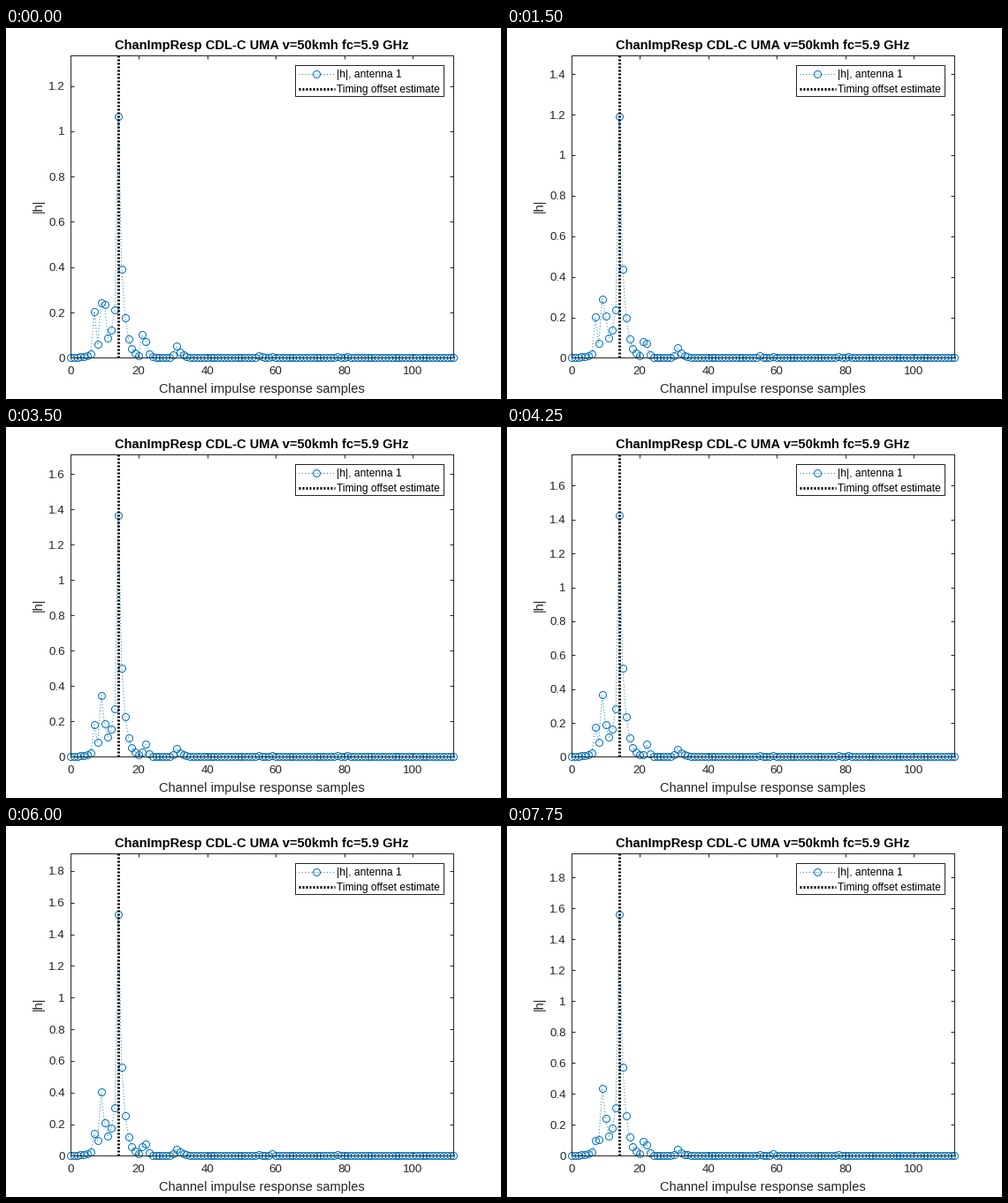
A matplotlib script that plays this animation: 560x420 px, repeating every 8 s.

```python
import matplotlib.pyplot as plt
import numpy as np
from matplotlib.animation import FuncAnimation
from matplotlib.lines import Line2D
from matplotlib.patches import Rectangle
from matplotlib.transforms import Affine2D

W, H = 560, 420
FRAMES, STEP_MS = 32, 250
PX = 0.72  # one pixel in points at 100 dpi
BLUE, INK = "#0072BD", "#262626"
LEFT, RIGHT, TOP, BOTTOM = 72.8, 506.4, 31.2, 373.4
PEAK = 14

plt.rcParams.update({
    "font.family": "Liberation Sans",
    "lines.scale_dashes": False,
    "text.color": "black",
})

taps = np.arange(113)


def response(t):
    """Magnitude of every tap at t seconds."""
    peak = 1.2376 + .326 * np.sin(.275 * (t - 2))
    lag = np.abs(taps - PEAK)
    h = np.where(taps < PEAK,
                 .2 * peak * np.maximum(lag, 1) ** -.82,
                 peak * np.exp(-lag ** .85))

    # onset, then the four early paths
    h[:7] = (.017 + .0013 * t) * .6 ** (6 - taps[:7])
    h[7] = .205 * np.cos(.136 * t)
    h[8] = .0615 + .0055 * t
    h[9] = .245 + .0325 * t - .001 * t * t
    h[10] = np.hypot(.188, .038 * (t - 3.75))

    # late echoes: place, height, decay per tap
    fading = np.hypot(.014, .105 * np.sin(.305 * (t - 4.2)))
    for at, amp, fall in ((21, fading, .2), (22, .073, .23),
                          (31, .051 - .0012 * t, .5), (55, .009, .4),
                          (59, .005 + .001 * t, .4), (78, .006, .4),
                          (81, .005, .5)):
        rate = np.where(taps > at, fall, fall / 2)
        h = np.maximum(h, amp * rate ** np.abs(taps - at))
    return np.maximum(h, .001)


def label(x, y, s, size, **kw):
    kw = {"va": "baseline", "rotation_mode": "anchor", **kw}
    fig.text(x / W, 1 - y / H, s, fontsize=size * PX, **kw)


def overlay(artist):
    artist.set_transform(to_px)
    fig.add_artist(artist)


fig = plt.figure(figsize=(W / 100, H / 100), dpi=100, facecolor="white")
ax = fig.add_axes([LEFT / W, 1 - BOTTOM / H,
                   (RIGHT - LEFT) / W, (BOTTOM - TOP) / H])
ax.set_xlim(0, 112)
ax.set_xticks(range(0, 101, 20))
ax.tick_params(direction="in", top=True, right=True, length=4.3 * PX,
               width=PX, color=INK, labelcolor=INK, labelsize=13.33 * PX)
ax.tick_params(axis="x", pad=9.5 * PX)
ax.tick_params(axis="y", pad=6 * PX)
for spine in ax.spines.values():
    spine.set(linewidth=PX, edgecolor=INK)

label(289.5, 24, "ChanImpResp CDL-C UMA v=50kmh fc=5.9 GHz", 14.67,
      ha="center", weight="bold")
label(289.7, 413, "Channel impulse response samples", 14.67,
      ha="center", color=INK)
label(41, 201, "|h|", 14.67, ha="center", rotation=90, color=INK)

thin = dict(color=BLUE, lw=.9 * PX, ls=(0, (PX, 2.5 * PX)))
ring = dict(marker="o", ms=8 * PX, mfc="none", mec=BLUE, mew=PX)
thick = dict(color="black", lw=3 * PX, ls=(0, (2 * PX, 2 * PX)),
             dash_capstyle="butt")

trace, = ax.plot(taps, response(0), clip_on=False, zorder=2, **thin, **ring)
ax.axvline(PEAK, zorder=3, **thick)

# legend, in pixels from the top left corner
to_px = Affine2D().scale(1 / W, -1 / H).translate(0, 1) + fig.transFigure
overlay(Rectangle((327, 42), 168, 35, fc="white", ec=INK, lw=PX))
overlay(Line2D([331, 372], [52, 52], **thin))
overlay(Line2D([351], [52], ls="none", **ring))
overlay(Line2D([331, 372], [69, 69], **thick))
label(374, 56, "|h|, antenna 1", 12)
label(374, 73, "Timing offset estimate", 12)


def draw(i):
    h = response(i * STEP_MS / 1000)
    top = 1.25 * h[PEAK]
    step = .5 if 1.5 <= top < 1.6 else .2
    ticks = np.arange(0, top, step)
    trace.set_ydata(h)
    ax.set_ylim(0, top)
    ax.set_yticks(ticks, [f"{v:.1f}".removesuffix(".0") for v in ticks])
    return trace,


anim = FuncAnimation(fig, draw, frames=FRAMES, interval=STEP_MS, repeat=True)
plt.show()
```
